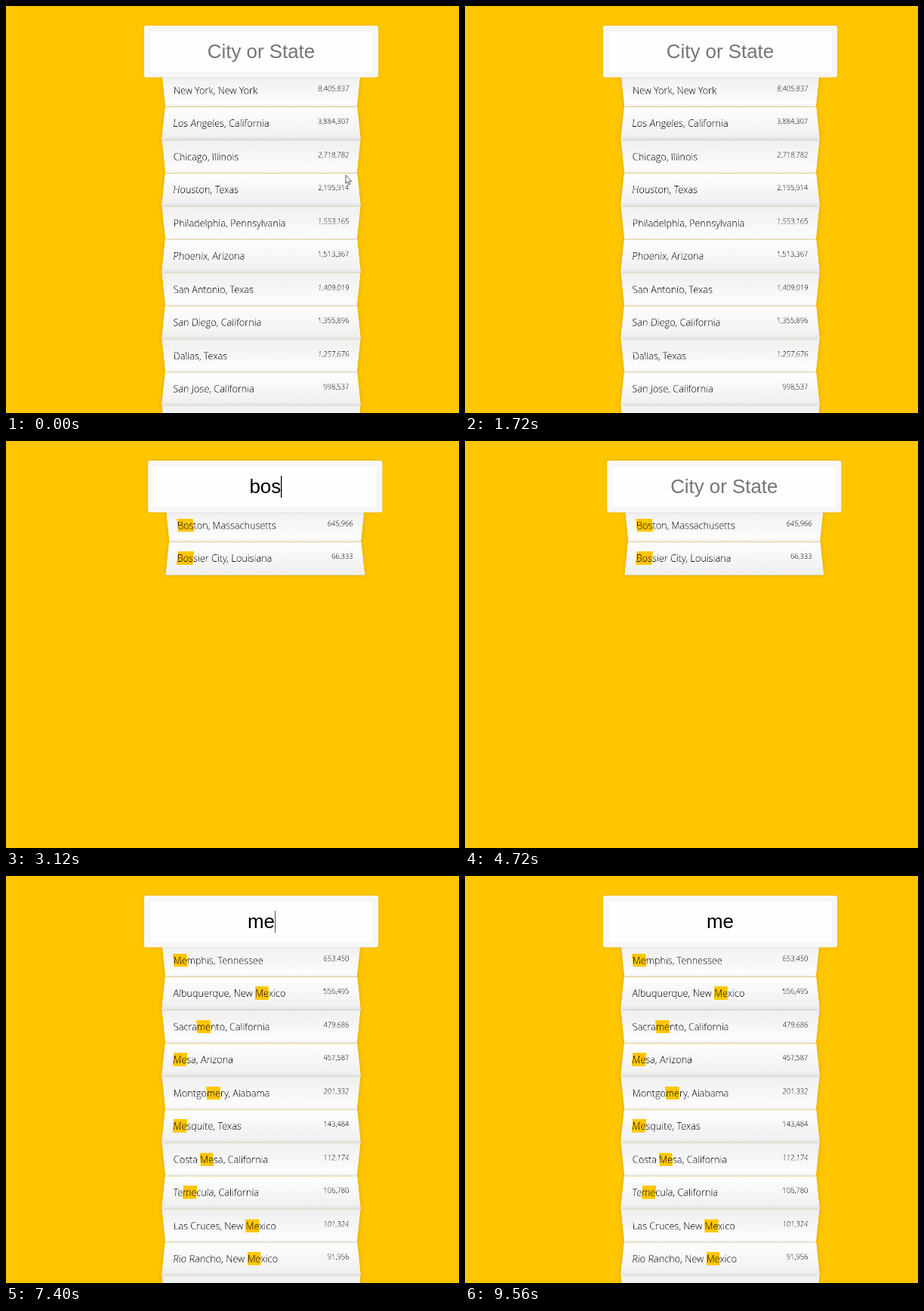
Recreate the animation shown at these times as an HTML page. Size 600 by 539 pixels, loop 9.72 s.

```html
<!DOCTYPE html>
<html lang="en">
<head>
<meta charset="utf-8">
<title>Type ahead</title>
<style>
  html, body { margin: 0; width: 100%; height: 100%; overflow: hidden; background: #ffc600; }
  #form {
    position: absolute; left: 0; top: 0; width: 400px; transform-origin: 0 0;
    font: 300 19.6px/27.6px "Open Sans", "Noto Sans", sans-serif; color: #000;
  }
  #search {
    position: absolute; left: -40px; top: 0; z-index: 2; box-sizing: border-box;
    width: 480px; height: 106px; border: 10px solid #f7f7f7; border-radius: 5px;
    background: #fefdff; text-align: center; white-space: pre;
    font: 400 40px/86px "Liberation Sans", Arial, sans-serif;
    box-shadow: 0 0 5px rgba(0,0,0,.12), inset 0 0 2px rgba(0,0,0,.19);
  }
  #hint { position: absolute; left: 0; right: 0; top: 0; color: #757575; }
  #box { position: relative; }
  #caret { position: absolute; left: 100%; top: 0; width: 1.6px; height: 45px; background: #000; }
  #list { position: absolute; left: 0; top: 96px; width: 400px; margin: 0; padding: 0; }
  li {
    box-sizing: border-box; height: 68px; padding: 20px; list-style: none;
    display: flex; justify-content: space-between; align-items: flex-start; white-space: pre;
    border-bottom: 1px solid #d8d8d8; box-shadow: 0 0 10px rgba(0,0,0,.14);
  }
  li:nth-child(even) {
    transform: perspective(100px) rotateX(3deg) translateY(2px) scale(1.001);
    background: linear-gradient(to bottom, #fefdff, #efeff0);
  }
  li:nth-child(odd) {
    transform: perspective(100px) rotateX(-3deg) translateY(3px);
    background: linear-gradient(to top, #fefdff, #efeff0);
  }
  li b { font-weight: 300; font-size: 14.4px; line-height: 20.6px; }
  mark { background: #ffc600; color: inherit; }
  #mouse { position: absolute; left: 0; top: 0; overflow: visible; }
</style>
</head>
<body>
<div id="form">
  <div id="search"><span id="hint">City or State</span><span id="box"><span id="text"></span><i id="caret"></i></span></div>
  <ul id="list"></ul>
</div>
<svg id="mouse" width="1" height="1">
  <path id="arrow" d="M0 0V11L2.5 8.8 4.1 12.6 5.9 11.8 4.3 8.2H7.6Z" fill="#fff" stroke="#333" stroke-width=".8"/>
  <path id="beam" d="M-2.5-7.5H2.5M0-7.5V7.5M-2.5 7.5H2.5" fill="none" stroke="#222"/>
</svg>
<script>
const LOOP = 9720, SCALE = .6465;
const $ = id => document.getElementById(id);

const places = {
  "": `New York, New York|8,405,837
Los Angeles, California|3,884,307
Chicago, Illinois|2,718,782
Houston, Texas|2,195,914
Philadelphia, Pennsylvania|1,553,165
Phoenix, Arizona|1,513,367
San Antonio, Texas|1,409,019
San Diego, California|1,355,896
Dallas, Texas|1,257,676
San Jose, California|998,537
|`,
  bo: `Boston, Massachusetts|645,966
Greensboro, North Carolina|279,639
Lubbock, Texas|239,538
Boise City, Idaho|214,237
Murfreesboro, Tennessee|117,044
Ann Arbor, Michigan|117,025
Boulder, Colorado|103,166
Hillsboro, Oregon|97,368
Dearborn, Michigan|95,884
Boca Raton, Florida|89,407
|`,
  bos: `Boston, Massachusetts|645,966
Bossier City, Louisiana|66,333`,
  me: `Memphis, Tennessee|653,450
Albuquerque, New Mexico|556,495
Sacramento, California|479,686
Mesa, Arizona|457,587
Montgomery, Alabama|201,332
Mesquite, Texas|143,484
Costa Mesa, California|112,174
Temecula, California|106,780
Las Cruces, New Mexico|101,324
Rio Rancho, New Mexico|91,956
|`
};

// time, typed text, query shown in the list
const steps = [
  [0, "", ""], [2280, "b", ""], [2640, "bo", "bo"], [2960, "bos", "bo"], [3040, "bos", "bos"],
  [4440, "bo", "bos"], [4480, "b", "bos"], [4560, " ", "bos"], [4720, "", "bos"],
  [6080, "", ""], [7120, "m", ""], [7400, "me", "me"]
];
const caretOn = [[1240, 1720], [2280, 3480], [4040, 4560], [6200, 6720], [7120, 7920], [8320, 8960], [9480, 9560]];
const moves = [[80, 1040, 450, 224, 305, 68], [1040, 1120, 305, 68, 307, 68], [1360, 1520, 307, 68, 516, 218]];

let shown = null;

function fillList(query) {
  if (query === shown) return;
  shown = query;
  const mark = s => query ? s.replace(new RegExp(query, "gi"), "<mark>$&</mark>") : s;
  $("list").innerHTML = places[query].split("\n").map(row => {
    const [name, count] = row.split("|");
    return `<li><span>${mark(name)}</span><b>${count}</b></li>`;
  }).join("");
}

function drawMouse(t) {
  let x = 450, y = 224;
  for (const [from, to, x0, y0, x1, y1] of moves) {
    if (t < from) break;
    const p = Math.min(1, (t - from) / (to - from)), k = p * p * (3 - 2 * p);
    x = x0 + (x1 - x0) * k;
    y = y0 + (y1 - y0) * k;
  }
  const inBox = y < 94 && x < 493;
  $("mouse").style.display = t < 1560 ? "" : "none";
  $("mouse").style.transform = `translate(${x}px, ${y}px)`;
  $("arrow").style.display = inBox ? "none" : "";
  $("beam").style.display = inBox ? "" : "none";
}

function draw() {
  const t = performance.now() % LOOP;
  const [, text, query] = steps.filter(s => s[0] <= t).pop();
  // the short list needs no scrollbar, so the page centre moves right
  const centre = query === "bos" ? 343.3 : 338;
  $("form").style.transform = `translate(${centre - 200 * SCALE}px, 26px) scale(${SCALE})`;
  $("hint").style.display = text ? "none" : "";
  $("text").textContent = text;
  $("caret").style.display = caretOn.some(([a, b]) => t >= a && t < b) ? "" : "none";
  fillList(query);
  drawMouse(t);
  requestAnimationFrame(draw);
}
draw();
</script>
</body>
</html>
```
